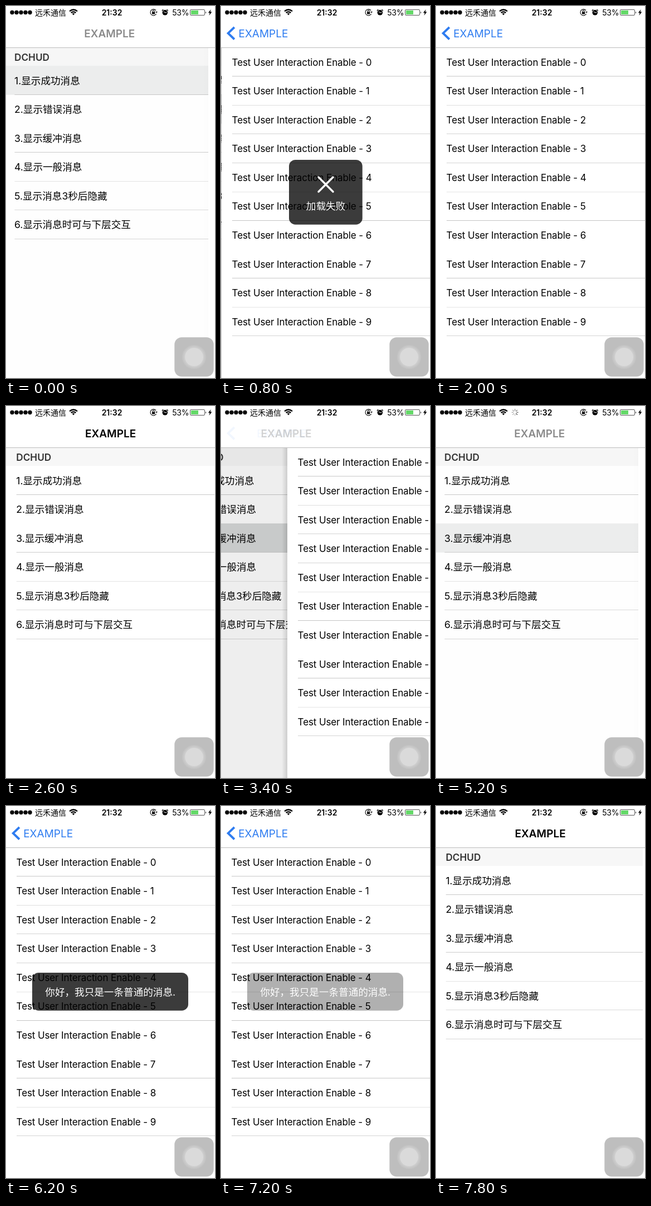
These frames come from a looping animation (375x665 px, 8 s). An HTML page:

```html
<!DOCTYPE html>
<html lang="zh-CN">
<head>
<meta charset="utf-8">
<title>HUD demo</title>
<style>
  html, body { margin: 0; width: 100%; height: 100%; overflow: hidden; background: #fff; }
  svg { display: block; width: 375px; height: 665px; }
  text { font-family: Inter, "Noto Sans CJK SC", "Noto Sans CJK", sans-serif; fill: #000; white-space: pre; }
  .row { font-size: 17.6px; }
  .test { font-size: 17px; letter-spacing: -.11px; }
  .head { font-size: 17.2px; font-weight: 600; fill: #333; }
  .title { font-size: 19px; font-weight: 600; text-anchor: middle; }
  .back { font-size: 19px; fill: #2e7cf0; }
  .status { font-size: 14px; }
  .hud rect { fill: #000; fill-opacity: .77; }
  .hud text { font-size: 17.6px; fill: #fff; text-anchor: middle; }
</style>
</head>
<body>
<svg viewBox="0 0 375 665">
  <defs>
    <linearGradient id="edge">
      <stop offset="0" stop-opacity="0"/>
      <stop offset="1" stop-opacity=".14"/>
    </linearGradient>
  </defs>
  <rect width="375" height="665" fill="#fff"/>

  <g id="list">
    <rect y="75" width="375" height="32" fill="#f7f7f7"/>
    <text class="head" x="18.6" y="97.5">DCHUD</text>
    <rect id="mark" width="375" height="52" fill="#d6d8d8"/>
  </g>
  <rect id="dim" y="75" width="375" height="590"/>

  <g id="detail">
    <rect id="shade" x="-10" y="75" width="10" height="590" fill="url(#edge)"/>
    <rect y="75" width="375" height="590" fill="#fff"/>
  </g>

  <rect width="375" height="74" fill="#fff"/>
  <rect y="74" width="375" height="1" fill="#bcbcbc"/>
  <text class="title" id="title" y="55.5">EXAMPLE</text>
  <g id="back">
    <path d="M24 38 L12.8 48.7 L24 59.5" fill="none" stroke="#2e7cf0" stroke-width="3.9"/>
    <text class="back" id="label" y="55.5">EXAMPLE</text>
  </g>

  <g id="status">
    <text class="status" x="52" y="16.5">远禾通信</text>
    <g fill="none" stroke="#000" stroke-width="2.2">
      <path d="M114 9.4 Q121 3.6 128 9.4 M116.6 12.2 Q121 8.6 125.4 12.2"/>
      <path d="M118.6 13.6 Q121 12 123.4 13.6 L121 16.4 Z" fill="#000" stroke="none"/>
    </g>
    <text class="status" x="190" y="16.5" font-weight="600" text-anchor="middle">21:32</text>
    <g fill="none" stroke="#000" stroke-width="1.1">
      <path d="M269.2 8.2 A5.6 5.6 0 1 0 269.6 14"/>
      <path d="M263 10.5 V9.4 a1.6 1.6 0 0 1 3.2 0 V10.5"/>
      <path d="M262 10.4 h5.2 v4 h-5.2 Z M268 10 h4 l-2 2.6 Z" fill="#000" stroke="none"/>
    </g>
    <circle cx="285.3" cy="11.8" r="4.8"/>
    <path d="M279.9 8.4 L282.2 6.3 M290.7 8.4 L288.4 6.3" stroke="#000" stroke-width="1.4"/>
    <path d="M282.8 9.6 L285.3 12 L288.4 11" fill="none" stroke="#fff"/>
    <text class="status" x="298.3" y="16.5" letter-spacing="-.25">53%</text>
    <rect x="330.5" y="6.5" width="26" height="10" rx="1.5" fill="none" stroke="#555"/>
    <rect x="332" y="8" width="13" height="7" fill="#62d866"/>
    <path d="M358 9.5 q1.8 2 0 4 Z"/>
    <path d="M367.6 6 L362.8 12.2 H365.6 L364.4 17 L369.4 10.6 H366.5 Z"/>
    <g id="net" stroke="#555" stroke-width="1.3" stroke-linecap="round" transform="translate(141.7 11.3)"></g>
  </g>

  <g class="hud" id="failed">
    <rect x="122" y="275" width="131.7" height="115.7" rx="11.5"/>
    <path d="M175 306 l26 26 m0 -26 l-26 26" stroke="#fff" stroke-width="3.5" stroke-linecap="round"/>
    <text x="188" y="363.5">加载失败</text>
  </g>
  <g class="hud" id="loading">
    <rect x="122" y="275" width="131.7" height="115.7" rx="11.5"/>
    <g id="wheel" stroke="#fff" stroke-width="4.2" stroke-linecap="round" transform="translate(188 319.7)"></g>
    <text x="188" y="363.5">正在加载...</text>
  </g>
  <g class="hud" id="message">
    <rect x="47" y="298" width="280" height="67.7" rx="11.5"/>
    <text x="187.2" y="339">你好，我只是一条普通的消息.</text>
  </g>

  <rect x="302.3" y="592.2" width="70.4" height="70.4" rx="13" fill="#bebebe"/>
  <circle cx="337.5" cy="627.5" r="21.5" fill="#c5c5c5"/>
  <circle cx="337.5" cy="627.5" r="19" fill="#cccccc"/>
  <circle cx="337.5" cy="627.5" r="16.5" fill="#dadada"/>
</svg>
<script>
const W = 375, LOOP = 8000, TICK = 200, PITCH = 51.55, RATE = .014;
const $ = id => document.getElementById(id);
const clamp = v => Math.max(0, Math.min(1, v));

function add(parent, tag, attrs, text = '') {
  const el = document.createElementNS('http://www.w3.org/2000/svg', tag);
  for (const k in attrs) el.setAttribute(k, attrs[k]);
  el.textContent = text;
  return parent.appendChild(el);
}

// Rows of text, each with a hairline of its own grey level (0 = none)
function rows(parent, cls, labels, base, lineY, greys) {
  labels.forEach((label, i) => {
    add(parent, 'text', { class: cls, x: 18.6, y: base + i * PITCH }, label);
    if (greys[i]) add(parent, 'rect', {
      x: 19, y: Math.round(lineY + i * PITCH), width: W - 19, height: 1,
      fill: `rgb(${greys[i]},${greys[i]},${greys[i]})`
    });
  });
}
rows($('list'), 'row',
  ['显示成功消息', '显示错误消息', '显示缓冲消息', '显示一般消息', '显示消息3秒后隐藏', '显示消息时可与下层交互']
    .map((s, i) => `${i + 1}.${s}`),
  139.5, 158.2, [200, 0, 204, 228, 218, 214]);
rows($('detail'), 'test',
  Array.from({ length: 10 }, (_, i) => `Test User Interaction Enable - ${i}`),
  106.7, 125.35, [200, 222, 212, 212, 228, 196, 0, 200, 228, 212]);

for (let i = 0; i < 5; i++) add($('status'), 'circle', { cx: 11 + 8 * i, cy: 11.5, r: 3.7 });

function spinner(parent, count, inner, outer) {
  for (let i = 0; i < count; i++)
    add(parent, 'line', { y1: -inner, y2: -outer, transform: `rotate(${i * 360 / count})` });
}
spinner($('wheel'), 12, 12, 18.5);
spinner($('net'), 8, 3, 5.6);

function spin(parent, head, low) {
  const n = parent.children.length;
  [...parent.children].forEach((spoke, i) => {
    const age = ((head - i) % n + n) % n;
    spoke.setAttribute('opacity', low + (1 - low) * (1 - age / (n - 1)) ** 1.4);
  });
}

const moves = [
  { at: -246, row: 0, pop: true },
  { at: 401, row: 1 },
  { at: 2201, row: 1, pop: true },
  { at: 3318, row: 2 },
  { at: 4954, row: 2, pop: true },
  { at: 5710, row: 3 },
  { at: 7476, row: 3, pop: true }
];

const fade = (id, v) => $(id).setAttribute('opacity', v);
const slide = (id, x) => $(id).setAttribute('transform', `translate(${x} 0)`);
const during = (t, from, to) => t >= from && t < to ? 1 : 0;

function draw(t) {
  const move = moves.filter(m => m.at <= t).pop();
  const age = t - move.at, rest = Math.exp(-RATE * age);
  // The page edge always sits on a whole pixel
  const edge = Math.round(W * (move.pop ? 1 - rest : rest));
  const cover = 1 - edge / W;

  slide('detail', edge);
  slide('list', -.3 * W * cover);
  fade('dim', .1 * cover);
  fade('shade', clamp(cover * 2));
  $('mark').setAttribute('y', 106.8 + PITCH * move.row);
  fade('mark', move.pop ? clamp((324 - age) / 180) : 1);

  const shift = 62 * cover + 61 * cover * cover;
  $('title').setAttribute('x', 187.8 - shift);
  fade('title', move.pop ? clamp((age - 182) / 142) : clamp(1 - age / 99));
  $('label').setAttribute('x', 31.2 + 104 * (1 - cover));
  fade('back', move.pop ? clamp(1 - age / 150) : clamp((age - 70) / 200));

  fade('failed', during(t, 800, 2000));
  fade('loading', during(t, 3600, 4800));
  fade('message', during(t, 6000, 7200) + .4 * during(t, 7200, 7400));
  fade('net', during(t, 3600, 5800));
  spin($('wheel'), 6 + Math.round((t - 4200) * .012), .22);
  spin($('net'), 3 + Math.round((t - 4200) * .008), .4);
}

function frame() {
  draw(Math.floor(performance.now() % LOOP / TICK) * TICK);
  requestAnimationFrame(frame);
}
frame();
</script>
</body>
</html>
```
